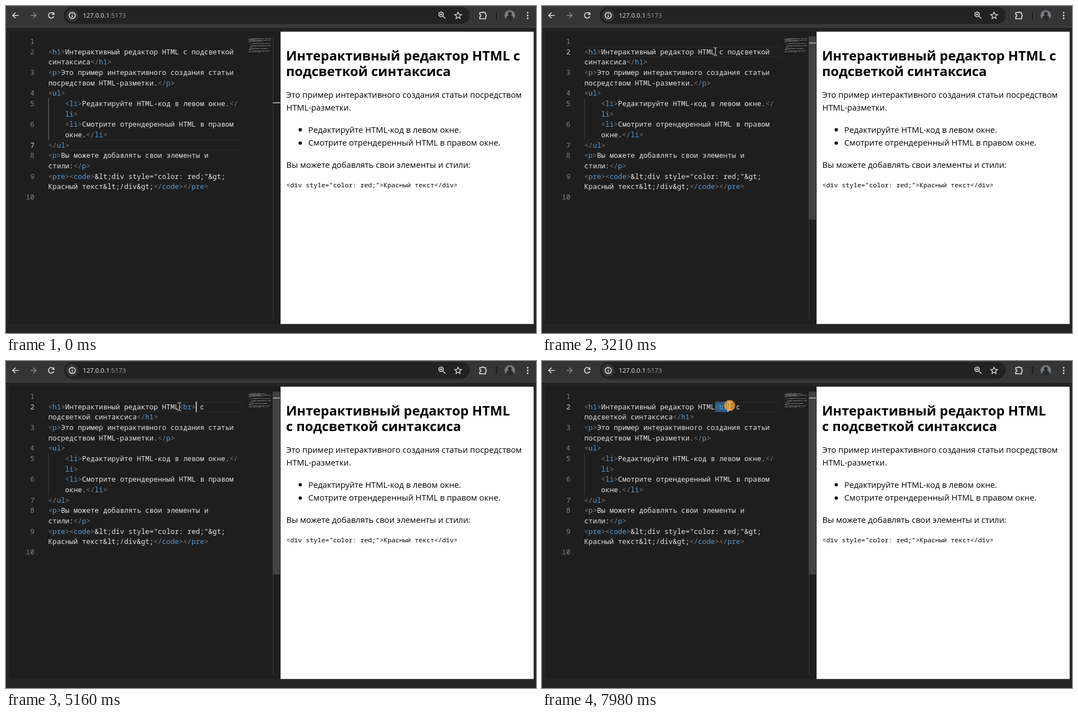
An HTML page that plays this animation: 952 px wide and 588 px high, repeating every 8000 ms.

```html
<!DOCTYPE html>
<html lang="ru">
<head>
<meta charset="utf-8">
<title>HTML editor</title>
<style>
html, body { margin: 0; width: 100%; height: 100%; overflow: hidden; background: #242424; }
svg { display: block; width: 100%; height: 100%; }
text { white-space: pre; }
.code { font: 12.62px "Noto Sans Mono", monospace; fill: #e6e6e6; }
.minimap { font-weight: bold; }
.tag { fill: #569cd6; }
.mark { fill: #808080; }
.error { fill: #d81616; }
.number { fill: #858585; text-anchor: end; }
.current { fill: #d0d0d0; }
.match { fill: #3fa5f0; font-weight: bold; }
.page { font: 14.75px "Open Sans", "Noto Sans", sans-serif; fill: #000; }
.page .bold { font-size: 23.8px; font-weight: bold; }
.page .pre { font: 11.67px "Noto Sans Mono", monospace; }
.page .bigpre { font: bold 23.4px "Noto Sans Mono", monospace; }
.url { font: 11.4px "Open Sans", "Noto Sans", sans-serif; fill: #e8e8e8; }
.icon { fill: none; stroke: #e3e3e3; stroke-width: 1.6; }
</style>
</head>
<body>
<svg viewBox="0 0 952 588">
  <defs>
    <clipPath id="pane"><rect x="494" y="47" width="453" height="524"/></clipPath>
    <path id="wrench" d="M-6.500 4.500 0-1.500A4.200 4.200 0 0 1 5-6.800L2.400-4 4-2.400 6.900-5A4.200 4.200 0 0 1 1.700 1.600L-4.400 7Q-7.500 7.500-6.500 4.500Z" fill="none" stroke="#d0d0d0" stroke-width="1.300"/>
    <path id="ibeam" d="M-3.500-7H-1L0-6 1-7H3.500M0-6V6M-3.500 7H-1L0 6 1 7H3.500" fill="none" stroke="#e0e0e0"/>
    <path id="arrow" d="M0 0V16L3.800 12.500 6.400 18.200 8.800 17.100 6.300 11.600H11.500Z" fill="#fff" stroke="#000"/>
  </defs>

  <rect width="952" height="588" fill="#242424"/>
  <rect width="952" height="37" fill="#353535"/>
  <rect y="37" width="952" height="1.300" fill="#4a4a4a"/>
  <rect x="104" y="2" width="729" height="30" rx="15" fill="#222"/>
  <circle cx="119" cy="17" r="11" fill="#353535"/>
  <g class="icon">
    <path d="M22.500 17H12.500M17 12 12 17 17 22"/>
    <path d="M43.500 17H53.500M49 12 54 17 49 22" stroke="#858585"/>
    <path d="M85.500 14A5 5 0 1 0 86 18.500M86.200 11.500V15H82.500"/>
    <circle cx="119" cy="17" r="5.500"/>
    <path d="M119 16.500V20M119 13.700V15.200"/>
    <circle cx="781.500" cy="15" r="4"/>
    <path d="M784.500 18 789 22.500M779.500 15H783.500M781.500 13V17" stroke-width="1.300"/>
    <path d="M812 11 813.700 15 818 15.400 814.700 18.200 815.700 22.500 812 20.200 808.300 22.500 809.300 18.200 806 15.400 810.300 15Z" stroke-width="1.300"/>
    <path d="M851 12H855A1.800 1.800 0 0 1 858.500 12H861.500V15.500A1.800 1.800 0 0 1 861.500 19V23H851V19.500A2 2 0 0 0 851 15.500Z"/>
  </g>
  <text class="url" x="138" y="21.300">127.0.0.1<tspan fill="#9d9d9d">:5173</tspan></text>
  <rect x="880" y="10" width="1.500" height="14" fill="#161616"/>
  <circle cx="905" cy="17" r="9.500" fill="#777b80"/>
  <path d="M898 23.500Q899 17.500 903 17A3.600 3.600 0 1 1 907 17Q911 17.500 912 23.500A9.500 9.500 0 0 1 898 23.500Z" fill="#292b2e"/>
  <g fill="#e3e3e3"><circle cx="937" cy="12" r="1.500"/><circle cx="937" cy="17" r="1.500"/><circle cx="937" cy="22" r="1.500"/></g>

  <rect x="5" y="46" width="488" height="526" fill="#1e1e1e"/>
  <rect x="493.500" y="46.500" width="454" height="525" fill="#fff" stroke="#ccc"/>
  <g id="scene"></g>
</svg>
<script>
const LOOP = 8000;
const LEFT = 76, CHAR = 7.572, ROW = 18.67;
const column = n => LEFT + n * CHAR;
const rowTop = n => 54.3 + n * ROW;
const smooth = k => k * k * (3 - 2 * k);
const escape = s => s.replace(/&/g, "&amp;").replace(/</g, "&lt;");
const text = (x, y, s, cls = "") => `<text class="${cls}" x="${x}" y="${y}">${escape(s)}</text>`;
const box = (x, y, w, h, fill, more = "") =>
  `<rect x="${x}" y="${y}" width="${w}" height="${h}" fill="${fill}" ${more}/>`;

// Rows that start a numbered source line; the others are wrapped continuations.
const numberedRows = [0, 1, 3, 5, 6, 8, 10, 11, 13, 15];
const typing = [[3710, "<"], [4340, "<b"], [4930, "<br"], [5160, "<br>"]];
const bracketsFrom = 5190, dragFrom = 7600;
const presses = [[1450, 1620], [2450, 2700], [dragFrom, LOOP]];
const carets = [
  [1450, 2000, 25], [2450, 3210, 31], [3710, 4190, 32], [4340, 4930, 33],
  [4930, 5160, 34], [5160, 5670, 35], [6160, 6670, 35], [7170, dragFrom, 35]
];
const mousePath = [
  [40, 887, 415], [780, 214, 190], [880, 214, 190], [1400, 270, 84], [1710, 271, 85],
  [1870, 271, 85], [2170, 322, 82], [2380, 322, 82], [2390, 303, 82], [2500, 311, 82],
  [6160, 311, 82], [6630, 407, 90], [6720, 414, 91], [6930, 352, 84],
  [7310, 315, 82], [7600, 315, 81], [7980, 337, 81]
];
const popups = {
  "<": { x: 318, words: "/h1 a abbr address area article aside audio b base bdi bdo" },
  "<b": { x: 325.5, words: "b base bdi bdo blockquote body br button" },
  "<br": { x: 325.5, words: "br" }
};

function mouseAt(t) {
  const next = mousePath.findIndex(p => p[0] > t);
  if (next < 0) return mousePath.at(-1).slice(1);
  const [t0, x0, y0] = mousePath[next - 1], [t1, x1, y1] = mousePath[next];
  const k = smooth((t - t0) / (t1 - t0));
  return [x0 + (x1 - x0) * k, y0 + (y1 - y0) * k];
}

function sourceRows(typed) {
  const wraps = typed.length > 1;
  return [
    "",
    "<h1>Интерактивный редактор HTML" + typed + " с" + (wraps ? "" : " подсветкой"),
    (wraps ? "подсветкой " : "") + "синтаксиса</h1>",
    "<p>Это пример интерактивного создания статьи",
    "посредством HTML-разметки.</p>",
    "<ul>",
    "    <li>Редактируйте HTML-код в левом окне.</",
    "    li>",
    "    <li>Смотрите отрендеренный HTML в правом",
    "    окне.</li>",
    "</ul>",
    "<p>Вы можете добавлять свои элементы и",
    "стили:</p>",
    '<pre><code>&lt;div style="color: red;"&gt;',
    "Красный текст&lt;/div&gt;</code></pre>",
    ""
  ];
}

const span = (cls, s) => `<tspan class="${cls}">${escape(s)}</tspan>`;

function colourTag(tag) {
  const bracket = /^<[a-z]*$/.test(tag) ? "error" : "mark";
  return tag.replace(/[<>\/]+|[^<>\/]+/g, s => span(/[<>\/]/.test(s) ? bracket : "tag", s));
}

function colourRow(row, plain) {
  if (plain) return escape(row);
  return row.split(/(<\/?[a-z\d]*>?|^\s*li>)/)
    .map((part, i) => i % 2 ? colourTag(part) : escape(part)).join("");
}

function editor(t, typed, selected, over) {
  const rows = sourceRows(typed), active = t < 1450 ? 10 : 1;
  const unclosed = typed === "<b" || typed === "<br";
  const bracketed = t >= bracketsFrom && selected === 31;
  const code = rows.map((row, i) =>
    `<text x="${LEFT}" y="${68 + i * ROW}">${colourRow(row, unclosed && i === 2)}</text>`).join("");
  const top = Math.round(rowTop(active));
  let out = box(LEFT, top, 352, 1, "#2a2a2a") + box(LEFT, top + 18, 352, 1, "#2a2a2a");
  out += box(76, 166, 1, 75, active === 10 ? "#707070" : "#404040");
  if (selected > 31) out += box(column(31), rowTop(1), (selected - 31) * CHAR, ROW, "#2b5a88", 'rx="3"');
  if (selected === 32) rows.forEach((row, i) => [...row].forEach((c, n) => {
    if (c === "<" && !(i === 1 && n === 31)) out += box(column(n), rowTop(i), CHAR, ROW, "#add6ff", 'opacity=".15"');
  }));
  if (bracketed) for (const n of [31, 34])
    out += box(column(n) + .5, rowTop(1) + .5, CHAR, ROW - 1, "#1d3020", 'stroke="#888"');
  out += `<g class="code">${code}` + numberedRows.map((row, i) =>
    text(51, 68 + row * ROW, String(i + 1), row === active ? "number current" : "number")).join("") + "</g>";
  out += `<g class="code minimap" transform="translate(426.500 50) scale(.122 .1)">${code}</g>`;
  out += box(479, 55, 1, 508, "#383838");
  if (over) out += box(479, 55, 13, 329, "#424244");
  if (bracketed) out += box(480, 66, 6, 11.5, "#a0a0a0");
  return out + box(479.5, active === 10 ? 173 : 65.5, 13, 2, "#a0a0a0");
}

function page(typed) {
  const title = "Интерактивный редактор HTML";
  const snippet = '<div style="color: red;">Красный текст</div>';
  const bold = (x, y, s) => text(x, y, s, "bold");
  const bullet = (x, y, r) => `<circle cx="${x}" cy="${y}" r="${r}"/>`;
  if (typed === "<b" || typed === "<br") {
    return bold(503, 98, title) +
      bold(503, 152, "Это пример интерактивного") + bold(503, 180, "создания статьи посредством") +
      bold(503, 208, "HTML-разметки.") +
      bullet(523.5, 253.3, 4.8) + bold(543, 262, "Редактируйте HTML-код в") + bold(543, 289.5, "левом окне.") +
      bullet(523.5, 309.3, 4.8) + bold(543, 318, "Смотрите отрендеренный") + bold(543, 345.5, "HTML в правом окне.") +
      bold(503, 399, "Вы можете добавлять свои") + bold(503, 427.5, "элементы и стили:") +
      text(503.5, 479, snippet, "bigpre") +
      box(494, 556, 453, 15, "#2c2c2c") + box(509, 557.5, 306, 12, "#6b6b6b") +
      '<path d="M503 560.500V567L499 563.700ZM938 560.500V567L942 563.700Z" fill="#d0d0d0"/>';
  }
  const first = typed === "" ? " с" : typed === "<" ? "<" : "";
  return bold(503, 98, title + first) +
    bold(503, 126, (typed ? "с " : "") + "подсветкой синтаксиса") +
    text(503.5, 165, "Это пример интерактивного создания статьи посредством") +
    text(503.5, 188.3, "HTML-разметки.") +
    bullet(528.5, 222.5, 3) + text(543, 227.6, "Редактируйте HTML-код в левом окне.") +
    bullet(528.5, 246.5, 3) + text(543, 251.4, "Смотрите отрендеренный HTML в правом окне.") +
    text(503.5, 290.5, "Вы можете добавлять свои элементы и стили:") +
    text(503.5, 326, snippet, "pre");
}

function popup(typed) {
  if (!popups[typed]) return "";
  const { x, words } = popups[typed], list = words.split(" "), prefix = typed.slice(1);
  let out = box(x + .5, 91.5, 423.5, list.length * ROW + 3, "#252526", 'stroke="#454545" rx="2"') +
    box(x + 1, 92, 422.5, ROW, "#143655");
  if (prefix === "b") out += box(x + 414, 92, 9.5, list.length * ROW + 2, "#797979", 'opacity=".4"');
  list.forEach((word, i) => {
    const y = 105.7 + i * ROW;
    out += `<use href="#wrench" x="${x + 11}" y="${y - 4.7}"/>` +
      `<text class="code" x="${x + 22.5}" y="${y}">${span("match", prefix)}${word.slice(prefix.length)}</text>`;
  });
  return out;
}

function pointer(t, x, y, over) {
  if (t < 40) return "";
  const pressed = presses.some(([from, to]) => t >= from && t < to);
  return (pressed ? `<circle cx="${x}" cy="${y - 1}" r="10" fill="#e69b21" opacity=".85"/>` : "") +
    `<use href="#${over ? "ibeam" : "arrow"}" x="${Math.round(x) + (over ? .5 : 0)}" y="${Math.round(y)}"/>`;
}

function scene(t) {
  const typed = typing.filter(([from]) => t >= from).at(-1)?.[1] ?? "";
  const [x, y] = t < 40 ? [952, 588] : mouseAt(t);
  const over = x < 493;
  const selected = t < dragFrom ? 31 : Math.round((x - LEFT) / CHAR);
  const caret = t >= dragFrom ? selected : carets.find(([from, to]) => t >= from && t < to)?.[2];
  return editor(t, typed, selected, over) +
    `<g class="page" clip-path="url(#pane)">${page(typed)}</g>` +
    (caret ? box(column(caret) - .2, 73, 1.7, 18.7, "#d8d8d8") : "") +
    popup(typed) + pointer(t, x, y, over);
}

const stage = document.getElementById("scene");
let shown = "";
function draw() {
  const markup = scene(performance.now() % LOOP);
  if (markup !== shown) stage.innerHTML = shown = markup;
  requestAnimationFrame(draw);
}
draw();
</script>
</body>
</html>
```
